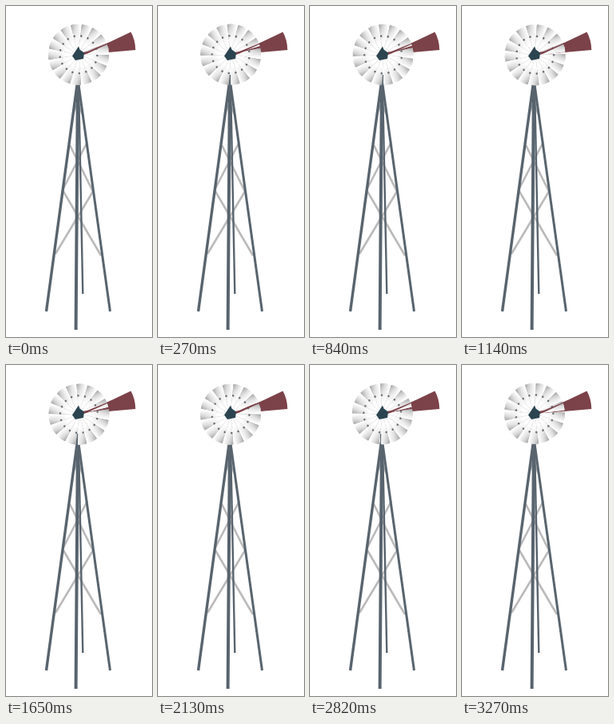
Animation of 183 by 414 pixels, one loop 3.3 s. Source, as an HTML page:

```html
<!DOCTYPE html>
<html lang="en">
<head>
<meta charset="utf-8">
<title>Wind pump</title>
<style>
html, body { margin: 0; height: 100%; overflow: hidden; background: #fff; }
svg { display: block; width: 183px; height: 414px; }
</style>
</head>
<body>
<svg viewBox="0 0 183 414">
  <defs>
    <linearGradient id="metal" x1="0" y1="0" x2="0" y2="1">
      <stop offset="0" stop-color="#a2a2a2"/>
      <stop offset=".45" stop-color="#d2d2d2"/>
      <stop offset="1" stop-color="#fafafa"/>
    </linearGradient>
    <radialGradient id="glow" gradientUnits="userSpaceOnUse" cx="0" cy="0" r="38">
      <stop offset=".4" stop-color="#fff"/>
      <stop offset="1" stop-color="#fff" stop-opacity="0"/>
    </radialGradient>
    <g id="blade">
      <path id="leaf" d="M8 -1.4L37.4 -5.6Q38.8 0 37.4 5.6L8 1.4Z" fill="url(#metal)"/>
      <use href="#leaf"/>
      <path d="M8 -1.4L37.4 -5.6Q38.8 0 37.4 5.6L8 1.4Z" fill="url(#glow)"/>
      <circle cx="23.3" cy="-2.6" r="1.3" fill="#6c7073"/>
    </g>
  </defs>
  <path d="M62 310L109 232L80 174M119 312L72 232M72 228L102 170M88 118L97 138M91 118L85 132"
        fill="none" stroke="#bbb9ba" stroke-width="2.6"/>
  <g fill="none" stroke="#58646e">
    <path d="M91 97L96.3 360" stroke-width="2.4"/>
    <path d="M89.3 97L50.5 382" stroke-width="3.4"/>
    <path d="M90.8 97L130.5 382" stroke-width="3"/>
    <path d="M90 86L87.6 405" stroke-width="4"/>
  </g>
  <path d="M97 58L128 46L156.5 32.5Q162 42 162.3 55L128 58L98 60.5Z" fill="#7b4249"/>
  <g id="wheel"></g>
  <path d="M97 58L103 56.4L130 45.5V46.5L102 59.5L97 61Z" fill="#7b4249"/>
  <path d="M83 62.5L91 50.5L92.5 54.5L98 58.5L97 66L87 68Z" fill="#2b4450"/>
</svg>
<script>
const LOOP = 3300, STEP = 30, BLADES = 17;
const wheel = document.getElementById('wheel');

for (let i = 0; i < BLADES; i++) {
  const blade = document.createElementNS('http://www.w3.org/2000/svg', 'use');
  blade.setAttribute('href', '#blade');
  blade.setAttribute('transform', `rotate(${94 + i * 360 / BLADES})`);
  wheel.append(blade);
}

// The hub sits slightly off the axis, so the wheel wobbles as it turns.
function draw(now) {
  const t = Math.floor(now % LOOP / STEP) * STEP;
  const turn = 360 * t / LOOP;
  const a = (turn - 120) * Math.PI / 180;
  const x = 91.2 + 0.5 * Math.cos(a), y = 61.2 + 0.5 * Math.sin(a);
  wheel.setAttribute('transform', `translate(${x} ${y}) rotate(${turn})`);
}

let start;
function tick(now) {
  start ??= now;
  draw(now - start);
  requestAnimationFrame(tick);
}
draw(0);
requestAnimationFrame(tick);
</script>
</body>
</html>
```
